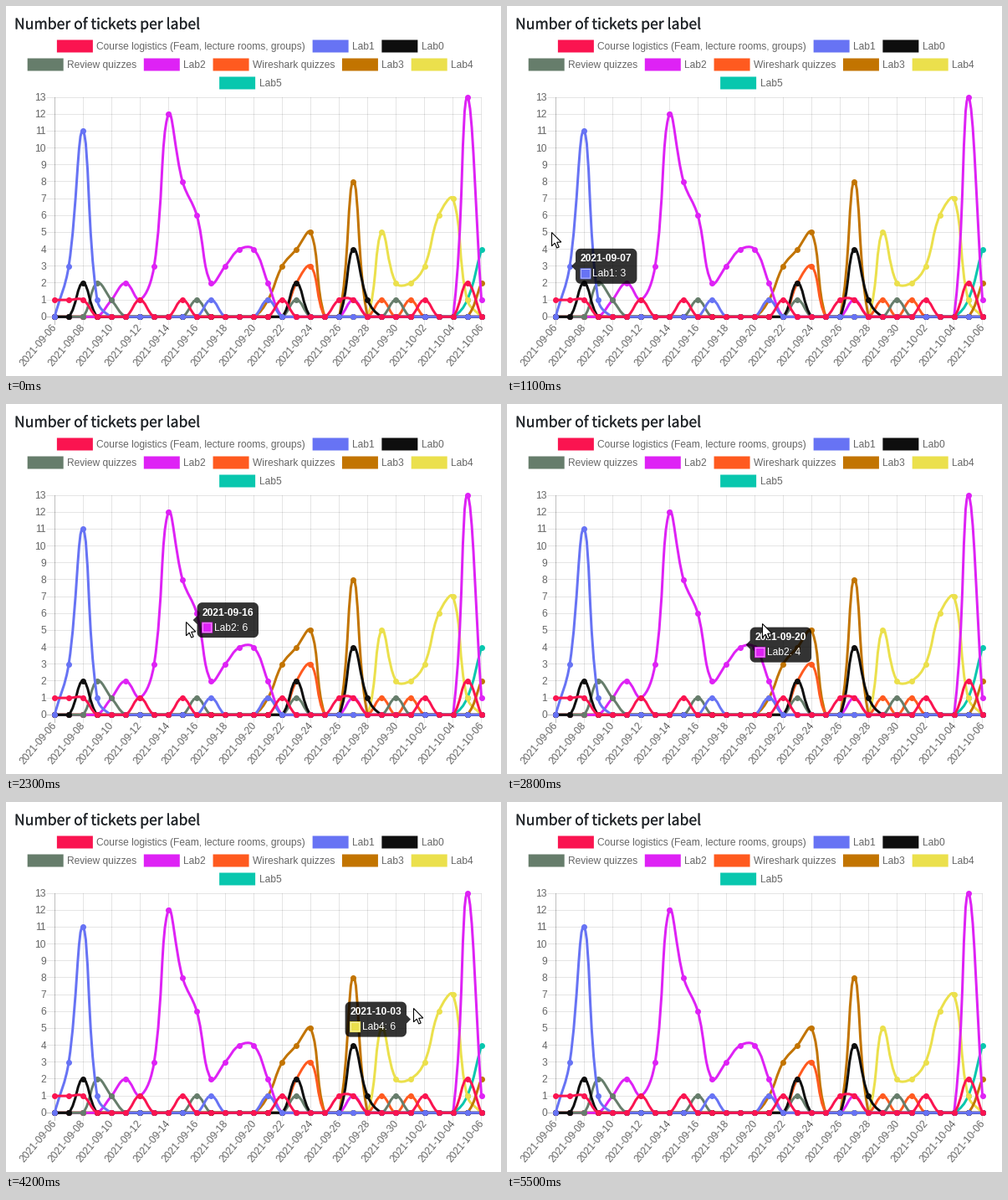
These frames come from a looping animation (592x442 px, 5.9 s). A matplotlib script:

```python
import math
import numpy as np
import matplotlib.pyplot as plt
import matplotlib.patheffects as pe
from matplotlib.animation import FuncAnimation
from matplotlib.patches import PathPatch, Polygon, Rectangle
from matplotlib.path import Path

W, H, DPI = 592, 442, 100
PT = 72 / DPI
FRAMES, STEP = 59, 100
DAYS, TOP = 31, 13
X0, DX = 58.0, 17.02
Y0, DY = 371.3, 20.17
CANVAS = (9, 577)
GREY, INK = "#666666", "#212529"

# name, colour, days with one ticket, busier runs by first day
SERIES = [
    ("Course logistics (Feam, lecture rooms, groups)", "#fa1450",
     (0, 1, 2, 6, 9, 16, 20, 21, 26), {29: [2]}),
    ("Lab1", "#6773f4", (3, 11, 15), {1: [3, 11]}),
    ("Lab0", "#0e0e0e", (22,), {2: [2], 17: [2], 21: [4]}),
    ("Review quizzes", "#667d6b", (4, 10, 17, 24), {3: [2]}),
    ("Lab2", "#de22f5", (4, 6, 21, 30),
     {5: [2], 7: [3, 12, 8, 6, 2, 3, 4, 4, 2], 29: [13]}),
    ("Wireshark quizzes", "#ff5a1f", (23, 25), {17: [2, 3]}),
    ("Lab3", "#c27400", (15,), {16: [3, 4, 5], 21: [8], 30: [2]}),
    ("Lab4", "#ebe04c", (29,), {23: [5, 2, 2, 3, 6, 7]}),
    ("Lab5", "#08c7ae", (29,), {30: [4]}),
]

# pointer path: ms, x, y
PATH = np.array([
    (600, -14, 292), (1100, 53, 270), (2130, 179, 262), (2300, 215, 260),
    (2737, 287, 262), (2800, 305, 262), (3680, 427, 243), (3700, 433, 243),
    (4900, 562, 250), (5250, 608, 268)])
TIP_W, TIP_H, CARET, GAP = 73.4, 42, 5, 7
EASE_MS = 400


def px(day):
    return X0 + DX * day


def py(value):
    return Y0 - DY * value


def date(day):
    d = 6 + day
    return f"2021-09-{d:02d}" if d <= 30 else f"2021-10-{d - 30:02d}"


def counts(ones, runs):
    y = np.zeros(DAYS, int)
    y[list(ones)] = 1
    for start, vals in runs.items():
        y[start:start + len(vals)] = vals
    return y


def spline(pts, tension=0.4):
    """Bezier path through pts, its handles kept inside the plot."""
    before = np.vstack([pts[:1], pts[:-1]])
    after = np.vstack([pts[1:], pts[-1:]])
    d0 = np.hypot(*(pts - before).T)
    d1 = np.hypot(*(after - pts).T)
    pull = tension * (after - before) / (d0 + d1)[:, None]
    lo, hi = (px(0), py(TOP)), (px(DAYS - 1), py(0))
    back = np.clip(pts - pull * d0[:, None], lo, hi)
    ahead = np.clip(pts + pull * d1[:, None], lo, hi)
    segs = np.stack([ahead[:-1], back[1:], pts[1:]], axis=1).reshape(-1, 2)
    return Path(np.vstack([pts[:1], segs]),
                [Path.MOVETO] + [Path.CURVE4] * len(segs))


fig = plt.figure(figsize=(W / DPI, H / DPI), dpi=DPI, facecolor="white")
ax = fig.add_axes([0, 0, 1, 1])
ax.set_xlim(0, W)
ax.set_ylim(H, 0)
ax.axis("off")


def text(x, y, s, size=12, color=GREY, font="Liberation Sans", **kw):
    return ax.text(x, y, s, fontsize=size * PT, color=color, family=font,
                   va="baseline", **kw)


def line(xs, ys, alpha):
    ax.plot(xs, ys, color="black", alpha=alpha, lw=PT, zorder=1,
            solid_capstyle="butt", snap=False)


def draw_grid():
    right = math.floor(px(DAYS - 1)) + 0.5
    for v in range(TOP + 1):
        y = math.floor(py(v)) + 0.5
        line([48.5, right], [y, y], 0.1 if v else 0.25)
        text(48, py(v) + 4, str(v), ha="right")
    a = math.radians(50)
    for day in range(0, DAYS, 2):
        x = math.floor(px(day)) + 0.5
        line([x, x], [py(TOP), 381], 0.1 if day else 0.25)
        text(px(day) + 4.2 * math.sin(a), 381 + 4.2 * math.cos(a), date(day),
             ha="right", rotation=50, rotation_mode="anchor")


def draw_legend(swatch=40, pad=6, gap=10, top=42, row_h=22):
    """Wrap the entries into centred rows."""
    rows, used = [[]], 0
    for name, color, *_ in SERIES:
        label = text(0, 0, name)
        width = swatch + pad + label.get_window_extent().width
        if used + width > CANVAS[1] - CANVAS[0]:
            rows.append([])
            used = 0
        rows[-1].append((label, color, width))
        used += width + gap
    for r, row in enumerate(rows):
        y = top + r * row_h
        x = (sum(CANVAS) - sum(e[2] for e in row) - gap * (len(row) - 1)) / 2
        for label, color, width in row:
            ax.add_patch(Rectangle((x - 1.5, y - 1.5), swatch + 3, 15,
                                   color=color, lw=0, snap=False))
            label.set_position((x + swatch + pad, y + 10.3))
            x += width + gap


def draw_series():
    for k, (_, color, ones, runs) in enumerate(SERIES):
        pts = np.column_stack([px(np.arange(DAYS)), py(counts(ones, runs))])
        ax.add_patch(PathPatch(spline(pts), fc="none", ec=color, lw=3 * PT,
                               zorder=20 - k))
        ax.plot(*pts.T, "o", color=color, ms=7 * PT, mew=0, zorder=20 - k)


POINTS = [(px(i), py(v), i, v, k) for k, s in enumerate(SERIES)
          for i, v in enumerate(counts(*s[2:]))]
XY = np.array([p[:2] for p in POINTS])


def pointer(ms):
    return (np.interp(ms, PATH[:, 0], PATH[:, 1]),
            np.interp(ms, PATH[:, 0], PATH[:, 2]))


def tip_goal(p):
    on_left = p[0] > (px(0) + px(DAYS - 1)) / 2
    x = p[0] - GAP - TIP_W if on_left else p[0] + GAP
    return np.array([x, p[1] - TIP_H / 2]), on_left


def simulate():
    """Tooltip position, opacity and item for each frame."""
    out, item, since = [], None, 0
    pos = start = goal = np.zeros(2)
    shown = start_op = goal_op = 0.0
    for ms in range(0, FRAMES * STEP, 5):
        x, y = pointer(ms)
        inside = CANVAS[0] < x < CANVAS[1]
        near = int(np.argmin(np.hypot(*(XY - (x, y)).T))) if inside else item
        if near != item or inside != (goal_op == 1):
            new_goal, _ = tip_goal(POINTS[near])
            start = new_goal if item is None else pos
            goal, item, since = new_goal, near, ms
            start_op, goal_op = shown, float(inside)
        q = 1 - (1 - min(1, (ms - since) / EASE_MS)) ** 4
        pos = start + (goal - start) * q
        shown = start_op + (goal_op - start_op) * q
        if ms % STEP == 0:
            out.append((pos, shown, item))
    return out


def bubble(x, y, on_left, r=6):
    def arc(cx, cy, a0):
        a = np.radians(np.linspace(a0, a0 + 90, 8))
        return list(zip(cx + r * np.cos(a), cy + r * np.sin(a)))

    x2, y2, mid = x + TIP_W, y + TIP_H, y + TIP_H / 2
    pts = arc(x + r, y + r, 180) + arc(x2 - r, y + r, 270)
    if on_left:
        pts += [(x2, mid - CARET), (x2 + CARET, mid), (x2, mid + CARET)]
    pts += arc(x2 - r, y2 - r, 0) + arc(x + r, y2 - r, 90)
    if not on_left:
        pts += [(x, mid + CARET), (x - CARET, mid), (x, mid - CARET)]
    return pts


text(10, 27.5, "Number of tickets per label", 17.6, INK, "Noto Sans CJK JP",
     path_effects=[pe.withStroke(linewidth=0.2 * PT, foreground=INK)])
draw_grid()
draw_legend()
draw_series()
STATES = simulate()

tip = ax.add_patch(Polygon([(0, 0), (1, 0), (1, 1)], fc="black", lw=0,
                           zorder=30, snap=False))
# nested squares: colour, thin white ring, colour
swatch = [ax.add_patch(Rectangle((0, 0), s, s, fc="white", lw=0, zorder=31,
                                 snap=False)) for s in (13, 11, 10)]
head = text(0, 0, "", color="white", weight="bold", zorder=35)
body = text(0, 0, "", color="white", zorder=35)
TIP_PARTS = [tip, head, body] + swatch

ARROW = np.array([(0.5, 0.5), (0.5, 16.8), (4.2, 13.2), (6.7, 19), (9.2, 18),
                  (6.7, 12.3), (11.8, 12)])
arrow = ax.add_patch(Polygon(ARROW, fc="white", ec="black", lw=1.1 * PT,
                             joinstyle="miter", zorder=40))


def update(i):
    (x, y), op, item = STATES[i]
    for part in TIP_PARTS:
        part.set_visible(op > 0.01)
        part.set_alpha(op)
    if op > 0.01:
        p = POINTS[item]
        name, color = SERIES[p[4]][:2]
        tip.set_xy(bubble(x, y, tip_goal(p)[1]))
        tip.set_alpha(0.8 * op)
        for s in swatch:
            off = 12 - s.get_width() / 2
            s.set_xy((x + off, y + 18 + off))
        swatch[0].set_facecolor(color)
        swatch[2].set_facecolor(color)
        head.set_text(date(p[2]))
        head.set_position((x + 6, y + 15.6))
        body.set_text(f"{name}: {p[3]}")
        body.set_position((x + 20, y + 33.6))
    cx, cy = pointer(i * STEP)
    arrow.set_visible(-12 < cx < W)
    arrow.set_xy(ARROW + (round(cx), round(cy)))
    return TIP_PARTS + [arrow]


anim = FuncAnimation(fig, update, frames=FRAMES, interval=STEP,
                     init_func=lambda: update(0), repeat=True, repeat_delay=0)
plt.show()
```
